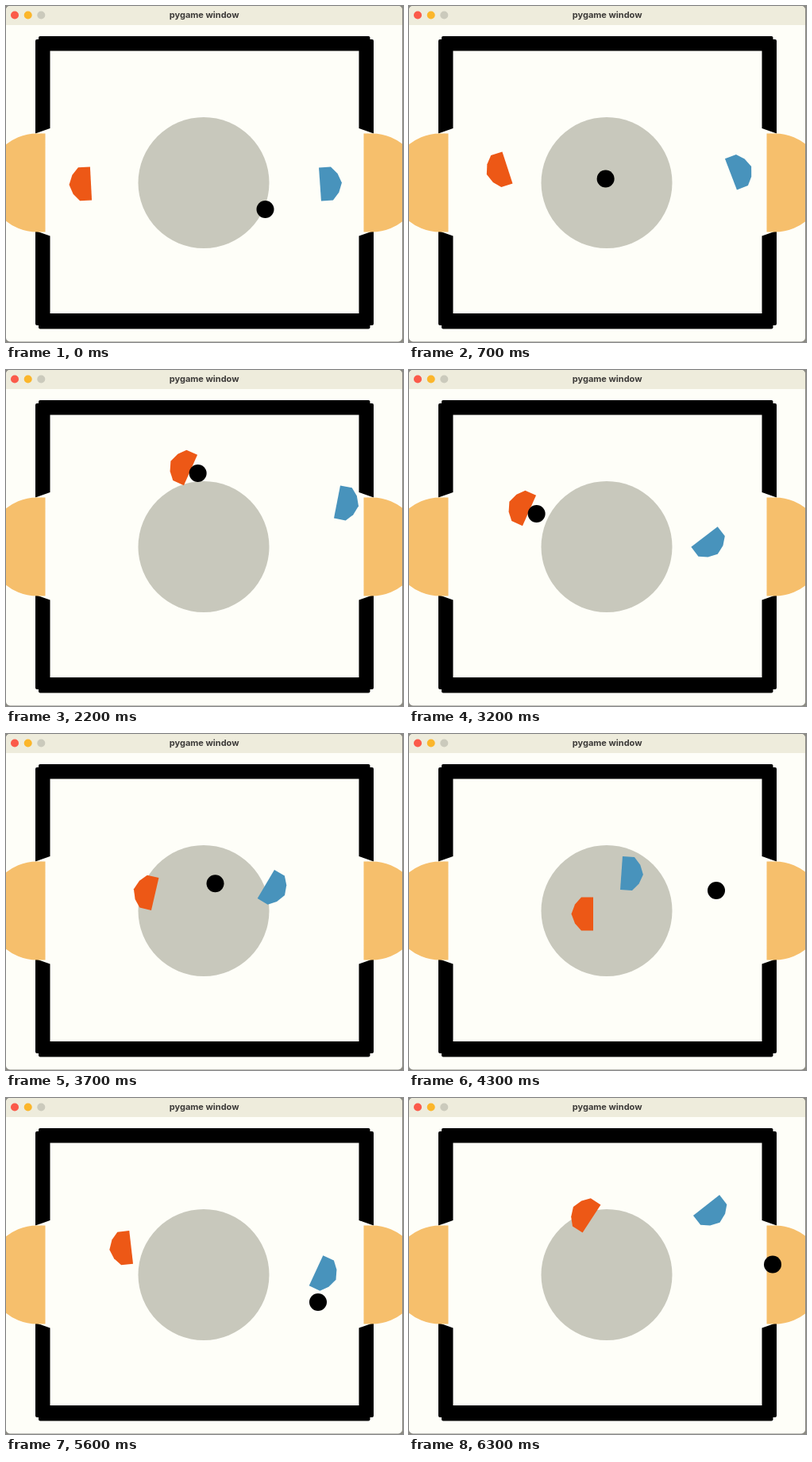
An HTML page for the animation above (6400 ms loop, 500 by 423 pixels).

```html
<!DOCTYPE html>
<html lang="en">
<head>
<meta charset="utf-8">
<title>pygame window</title>
<style>
  html, body { margin: 0; width: 100%; height: 100%; overflow: hidden; background: #8b8a82; }
  svg { display: block; width: 100vw; height: 100vh; }
  text { font: 700 11px Inter, "Open Sans", sans-serif; fill: #3d3b39; text-anchor: middle; }
</style>
</head>
<body>
<svg viewBox="0 0 500 423">
  <defs>
    <path id="player" d="M0-21V21H-15L-23 12L-27.5 0L-23-12L-15-21Z"/>
    <clipPath id="frame"><rect width="499" height="422.5" rx="5"/></clipPath>
    <g id="side">
      <path d="M37 44Q37 42 39 42H55.5V154L37 160.5Z"/>
      <path d="M37 283L55.5 289.5V402H39Q37 402 37 400Z"/>
      <path d="M49.5 160.5H39A62 62 0 0 0 39 284.5H49.5Z" fill="#f6bf6c"/>
    </g>
  </defs>

  <g clip-path="url(#frame)">
    <rect width="500" height="423" fill="#fefef8"/>
    <rect width="500" height="24" fill="#eeecdc"/>
    <circle cx="11" cy="11.5" r="5" fill="#fb5a4a"/>
    <circle cx="27.7" cy="11.5" r="5" fill="#fbb62b"/>
    <circle cx="44.3" cy="11.5" r="5" fill="#cbcabc"/>
    <text x="249.7" y="15">pygame window</text>

    <circle cx="249" cy="222.5" r="82.5" fill="#c8c8bc"/>
    <rect x="41" y="38" width="417.5" height="18.5" rx="2"/>
    <rect x="41" y="387" width="417.5" height="19.5" rx="2"/>
    <use href="#side"/>
    <use href="#side" transform="translate(500) scale(-1 1)"/>

    <use id="orange" href="#player" fill="#ed5816"/>
    <use id="blue" href="#player" fill="#4893bc"/>
    <circle id="ball" r="11"/>
  </g>
</svg>
<script>
  const LOOP = 6400, STEP = 100;
  const GRAB = 2200, KICK = 3200;   // the ball is carried between these times
  const turns = [0, 1300, GRAB, KICK, 4300, 5000, 6100];

  // Where each player changes course: x, y, heading in degrees.
  const orange = [
    [107, 223.5, -3], [138, 184, -31], [232.5, 126, 24], [151.5, 177, 24],
    [232, 226.5, 0], [77, 268.5, -54], [230, 152, 33]
  ];
  const blue = [
    [395.5, 224.5, 176], [413.5, 199.5, 144.5], [417, 166, 191], [372, 210, 232.5],
    [267.5, 175, 184], [416, 297.5, 172], [374.5, 135, 232]
  ];

  const lerp = (a, b, u) => a + (b - a) * u;
  const toward = degrees => [Math.cos(degrees * Math.PI / 180), Math.sin(degrees * Math.PI / 180)];

  // Index of the current leg and how much of it is done.
  function legAt(times, time) {
    const i = Math.max(0, times.findLastIndex((t, k) => t <= time && k < times.length - 1));
    return [i, Math.min(1, (time - times[i]) / (times[i + 1] - times[i]))];
  }

  // Players drive forwards or backwards, bending each leg toward their heading.
  function drive(poses, time) {
    const [i, u] = legAt(turns, time);
    const [x0, y0, from] = poses[i], [x1, y1, to] = poses[i + 1];
    const dx = x1 - x0, dy = y1 - y0, length = Math.hypot(dx, dy);
    const [hx, hy] = toward((from + to) / 2);
    const pull = Math.sign(dx * hx + dy * hy) * length / 2;
    const leave = toward(from), arrive = toward(to);
    const bend = (axis, delta) =>
      u * (1 - u) * ((1 - u) * (pull * leave[axis] - delta / 2)
                   - u * (pull * arrive[axis] - delta / 2));
    return [lerp(x0, x1, u) + bend(0, dx), lerp(y0, y1, u) + bend(1, dy), lerp(from, to, u)];
  }

  function nose(time) {
    const [x, y, heading] = drive(orange, time), [hx, hy] = toward(heading);
    return [x + 10 * hx, y + 10 * hy];
  }

  // The ball flies straight from touch to touch.
  const touches = [
    [0, 326.5, 256], [1300, 180, 184.5], [GRAB, ...nose(GRAB)], [KICK, ...nose(KICK)],
    [4300, 387, 197], [4800, 298, 331], [5000, 315, 314], [6100, 458, 209.5]
  ];
  const touchTimes = touches.map(touch => touch[0]);

  function fly(time) {
    if (time >= GRAB && time <= KICK) return nose(time);
    const [i, u] = legAt(touchTimes, time);
    return [1, 2].map(axis => lerp(touches[i][axis], touches[i + 1][axis], u));
  }

  function place(id, [x, y, angle = 0]) {
    document.getElementById(id)
      .setAttribute("transform", `translate(${x} ${y}) rotate(${angle})`);
  }

  const start = performance.now();

  function draw() {
    const elapsed = (performance.now() - start) % LOOP;
    const time = Math.floor(elapsed / STEP) * STEP;
    place("orange", drive(orange, time));
    place("blue", drive(blue, time));
    place("ball", fly(time));
    requestAnimationFrame(draw);
  }
  draw();
</script>
</body>
</html>
```
